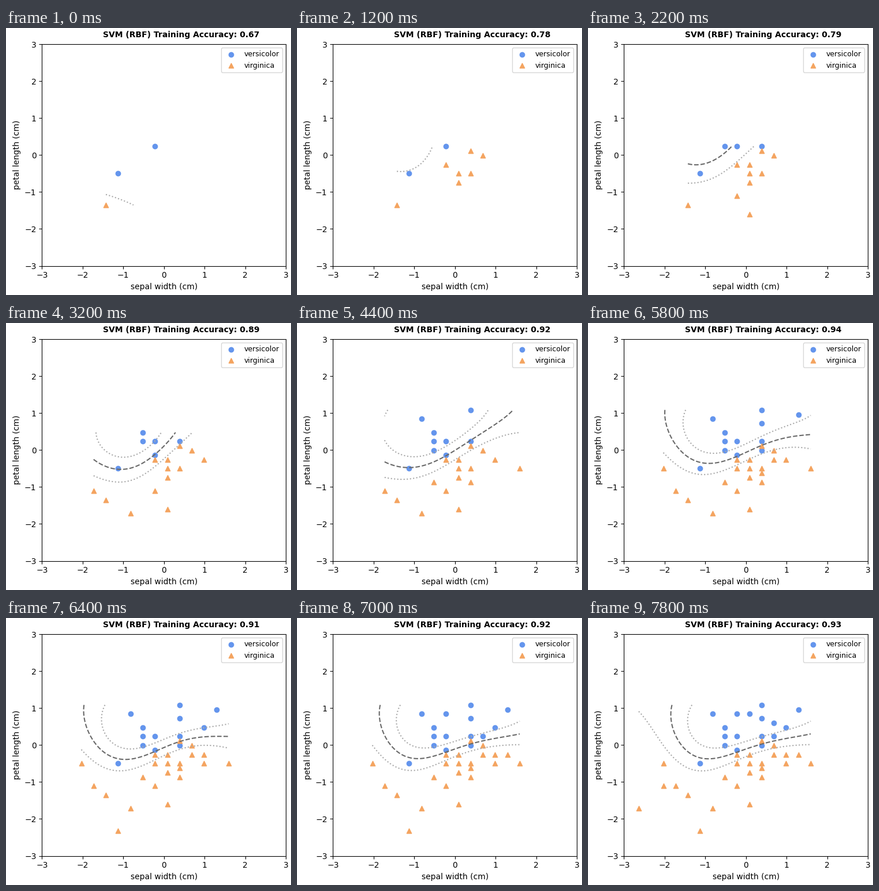
Write a matplotlib script that moves like this. It is 494 by 463 pixels and loops after 8 s.

```python
import numpy as np
import matplotlib.pyplot as plt
from matplotlib.animation import FuncAnimation

W, H, DPI = 494, 463, 100
FRAMES, START = 40, 3
GAMMA, C = 0.5, 1.0
BLUE, ORANGE = "cornflowerblue", "sandybrown"

# Samples in order of arrival: class and (width, length) in mm
SAMPLES = """
B25,45 B28,51 O24,38 O29,45 O30,50 O28,47 O29,43 O31,49 O30,45
B27,51 O29,36 O29,47 B30,51 O28,40 B28,48 O23,40 O32,47 O26,35 B27,53
B27,49 B26,56 O27,42 O34,45 B30,58 O30,42
O28,45 B33,57 O30,44 B30,49
O31,47 B30,55 O22,45 B32,53 O32,45 O25,30
B28,56 B31,51 O33,47 B31,54 O22,40 B29,56 O20,35
""".split()
MEAN, STD = (28.7275, 49.1), (3.311, 8.206)

labels = np.array([1.0 if s[0] == "B" else -1.0 for s in SAMPLES])
raw = np.array([[int(v) for v in s[1:].split(",")] for s in SAMPLES])
points = (raw - MEAN) / STD


def rbf(a, b):
    d = a[:, None, :] - b[None, :, :]
    return np.exp(-GAMMA * (d ** 2).sum(axis=2))


def train(x, y):
    """Soft-margin SVM by sequential minimal optimisation."""
    k = rbf(x, x)
    alpha = np.zeros(len(y))
    score = np.zeros(len(y))
    eps = 1e-9
    for _ in range(5000):
        room_up = np.where(y > 0, C - alpha, alpha)
        room_down = np.where(y > 0, alpha, C - alpha)
        err = y - score
        hi = np.where(room_up > eps, err, -np.inf)
        lo = np.where(room_down > eps, err, np.inf)
        i, j = hi.argmax(), lo.argmin()
        gap = hi[i] - lo[j]
        if gap < 1e-4:
            break
        curve = max(k[i, i] + k[j, j] - 2 * k[i, j], 1e-12)
        step = min(gap / curve, room_up[i], room_down[j])
        alpha[i] += y[i] * step
        alpha[j] -= y[j] * step
        score += step * (k[:, i] - k[:, j])
    free = (alpha > eps) & (alpha < C - eps)
    bias = err[free].mean() if free.any() else (hi[i] + lo[j]) / 2
    return alpha * y, bias


def solve(n):
    """Accuracy and decision surface for the first n samples."""
    x, y = points[:n], labels[:n]
    coef, bias = train(x, y)
    accuracy = np.mean(np.where(rbf(x, x) @ coef + bias > 0, 1, -1) == y)
    (x0, y0), (x1, y1) = x.min(axis=0), x.max(axis=0)
    gx, gy = np.meshgrid(np.linspace(x0, x1, 100), np.linspace(y0, y1, 100))
    grid = np.column_stack([gx.ravel(), gy.ravel()])
    surface = (rbf(grid, x) @ coef + bias).reshape(gx.shape)
    return accuracy, gx, gy, surface


states = [solve(START + i) for i in range(FRAMES)]

fig = plt.figure(figsize=(W / DPI, H / DPI), dpi=DPI)
ax = fig.add_axes([62.25 / W, 50.5 / H, 423 / W, 384.5 / H])
ax.set(xlim=(-3, 3), ylim=(-3, 3),
       xlabel="sepal width (cm)", ylabel="petal length (cm)")
dots = ax.scatter([], [], c=BLUE, marker="o", label="versicolor")
triangles = ax.scatter([], [], c=ORANGE, marker="^", label="virginica")
ax.legend(loc="upper right", fontsize=9)
title = fig.text(303.7 / W, 1 - 15.6 / H, "", ha="center", va="baseline",
                 fontsize=10, fontweight="bold")
curves = []


def update(i):
    n = START + i
    accuracy, gx, gy, surface = states[i]
    while curves:
        curves.pop().remove()
    for level, color, style in ((-0.5, "darkgray", ":"),
                                (0, "dimgray", "--"),
                                (0.5, "darkgray", ":")):
        if surface.min() < level < surface.max():
            curves.append(ax.contour(gx, gy, surface, levels=[level],
                                     colors=color, linestyles=style))
    x, y = points[:n], labels[:n]
    dots.set_offsets(x[y > 0])
    triangles.set_offsets(x[y < 0])
    title.set_text(f"SVM (RBF) Training Accuracy: {accuracy:.2f}")
    return dots, triangles, title


anim = FuncAnimation(fig, update, frames=FRAMES, interval=200,
                     init_func=lambda: update(0), repeat=True, repeat_delay=0)
plt.show()
```
